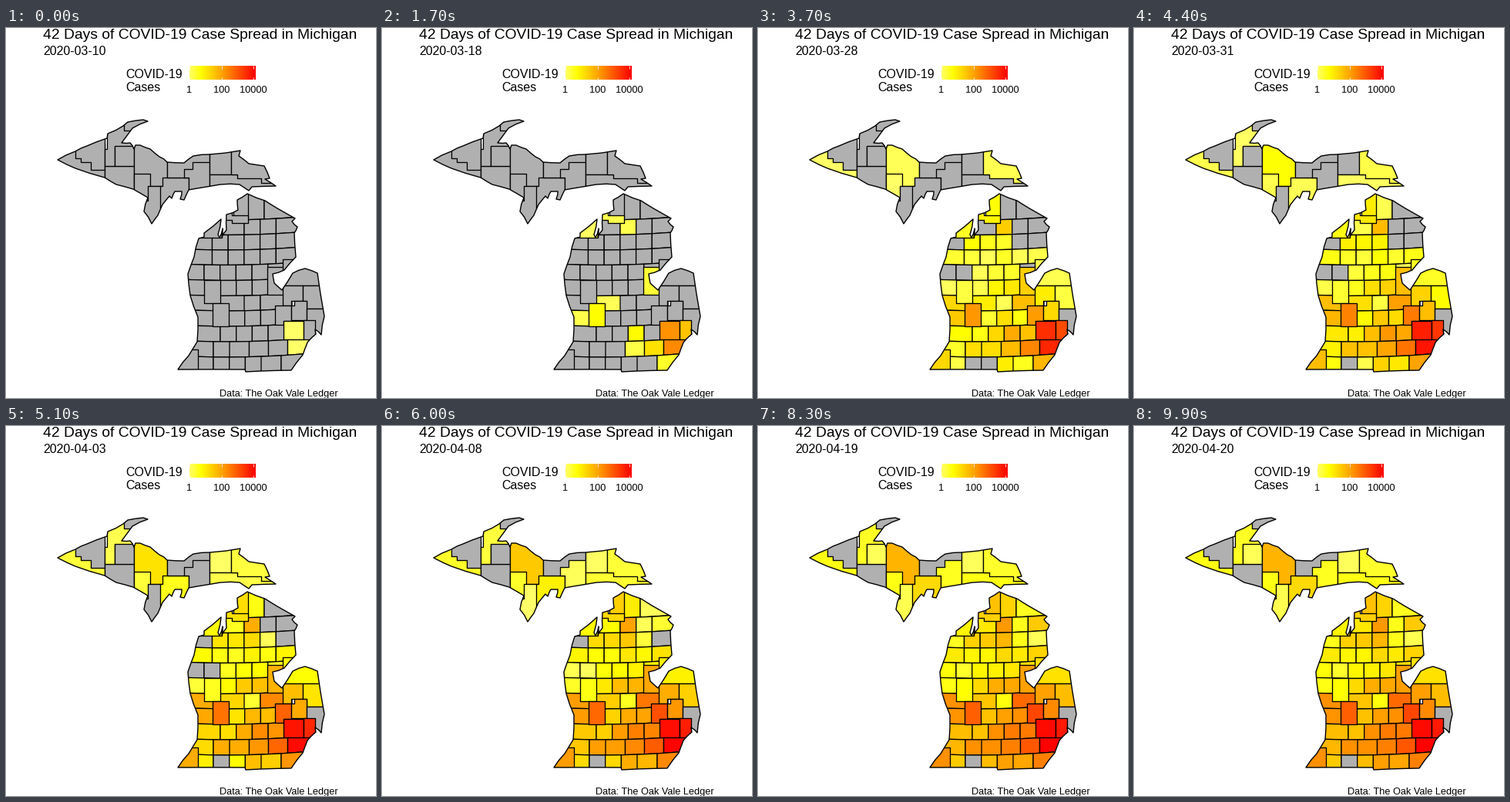
A matplotlib script that plays this animation: 480 px wide and 480 px high, repeating every 10000 ms.

```python
import random

import numpy as np
import matplotlib.pyplot as plt
from matplotlib.animation import FuncAnimation
from matplotlib.colors import LinearSegmentedColormap
from matplotlib.patches import Polygon

SIZE, DPI = 480, 72
FRAMES, INTERVAL = 100, 100
LAST_DAY, DAYS_PER_FRAME = 41, 0.477
NEVER = 99
GREY = "#b0b0b0"
HEAT = LinearSegmentedColormap.from_list(
    "heat", [(0, "#ffff68"), (0.17, "#ffff00"), (0.5, "#ffa000"), (1, "#ff0000")])

random.seed(4)
plt.rcParams["font.family"] = "Liberation Sans"
fig = plt.figure(figsize=(SIZE / DPI, SIZE / DPI), dpi=DPI, facecolor="white")
ax = fig.add_axes([0, 0, 1, 1])
ax.axis("off")

UPPER_NORTH = [
    (67, 171), (90, 160), (105, 153), (131, 143), (132, 137), (152, 127), (158, 122),
    (178, 119), (184, 121), (164, 130), (150, 149), (161, 149), (166, 157), (168, 152),
    (174, 152), (187, 157), (199, 167), (209, 174), (231, 175), (243, 166), (264, 164),
    (304, 159), (302, 166), (315, 176), (335, 179), (342, 195), (336, 196), (350, 205)]
UPPER_SOUTH = [
    (319, 206), (315, 211), (303, 203), (278, 203), (248, 208), (237, 210), (231, 223),
    (226, 222), (228, 212), (219, 212), (215, 221), (212, 218), (203, 229), (197, 243),
    (189, 254), (179, 238), (184, 220), (165, 209), (143, 203), (128, 194), (90, 182)]
LOWER_EAST = [
    (313, 215), (336, 224), (352, 234), (375, 247), (371, 251), (378, 258), (374, 266),
    (376, 297), (361, 314), (346, 319), (348, 331), (358, 340), (372, 318), (388, 312),
    (404, 318), (413, 374), (409, 398), (401, 391), (402, 397), (391, 408), (385, 424),
    (370, 444), (331, 445), (311, 446), (310, 443)]
LOWER_WEST = [
    (223, 443), (237, 425), (248, 407), (249, 375), (239, 347), (236, 319), (244, 297),
    (250, 273), (257, 271), (257, 266), (279, 248), (275, 268), (277, 272), (281, 260),
    (280, 271), (286, 262), (286, 242), (301, 236), (300, 223)]

counties = []


def land(points):
    """Coast with a slightly rough midpoint on every longer stretch."""
    coast = []
    for (x, y), (u, v) in zip(points, points[1:] + points[:1]):
        coast.append((x, y))
        if abs(u - x) + abs(v - y) > 9:
            coast.append(((x + u) / 2 + random.uniform(-0.8, 0.8),
                          (y + v) / 2 + random.uniform(-0.8, 0.8)))
    shape = Polygon(coast, fc="none", ec="black", lw=1.4, joinstyle="round", zorder=3)
    ax.add_patch(shape)
    return shape


def county(coast, onset, level, points):
    patch = Polygon(points, fc=GREY, ec="black", lw=1.3, joinstyle="round")
    ax.add_patch(patch)
    patch.set_clip_path(coast)
    counties.append((patch, onset, level))


def block(coast, onset, level, *path):
    """County with square corners; path alternates x and y moves."""
    xs, ys = path[::2], path[1::2]
    points = [(xs[0], ys[0])]
    for i in range(1, len(xs)):
        points += [(xs[i], ys[i - 1]), (xs[i], ys[i])]
    county(coast, onset, level, points + [(xs[0], ys[-1])])


def bend(x, y):
    """Parallels sag slightly towards the middle of the map."""
    return x, y - 0.0004 * (x - 285) ** 2


def row(top, bottom, left, right, *cells, step=20.7):
    """Counties side by side; later ones may cover the overhang of the last."""
    for i, (onset, level) in enumerate(cells):
        edge = right + (12 if i == len(cells) - 1 else 0)
        corners = [(left, top), (edge, top), (edge, bottom), (left, bottom)]
        county(lower, onset, level, [bend(x, y) for x, y in corners])
        left, right = right, right + step


upper, lower = land(UPPER_NORTH + UPPER_SOUTH), land(LOWER_EAST + LOWER_WEST)

# Upper Peninsula: first day with cases, final level, outline
block(upper, 17, 0.14, 60, 150, 128, 210)
block(upper, NEVER, 0, 90, 140, 128, 184, 110, 174, 97, 169)
block(upper, NEVER, 0, 128, 179, 166, 215)
block(upper, 20, 0.11, 131, 120, 165, 154, 141, 179, 128, 157)
block(upper, NEVER, 0, 153, 115, 190, 133)
block(upper, 37, 0.03, 141, 153, 166, 179)
block(upper, 17, 0.43, 166, 145, 209, 205)
block(upper, 17, 0.14, 166, 189, 187, 224)
block(upper, 28, 0.04, 184, 205, 201, 260, 165, 224)
block(upper, 20, 0.3, 203, 194, 237, 240, 200, 205)
block(upper, NEVER, 0, 209, 160, 264, 194)
block(upper, 27, 0.12, 242, 174, 264, 215, 237, 194, 231, 183)
block(upper, 22, 0.02, 264, 155, 292, 190)
block(upper, 20, 0.14, 264, 190, 352, 215)
block(upper, 12, 0.1, 292, 150, 360, 201, 331, 195, 300, 190)

# Lower Peninsula grid: first day with cases, final level
row(200, 249, 314, 335, (20, 0.32), (27, 0.12), step=40)
row(249, 268.5, 278, 309, (19, 0.25), (7, 0.52), (27, 0.13), (27, 0.35))
row(268.5, 288, 240, 267.5, (37, 0.13), (10, 0.33), (13, 0.35), (15, 0.42),
    (22, 0.13), (38, 0.04))
row(288, 307.5, 235, 267.5, (12, 0.24), (12, 0.2), (16, 0.2), (13, 0.3),
    (16, 0.24), (16, 0.32))
row(307.5, 327.5, 230, 257, (27, 0.16), (27, 0.1), (16, 0.2), (12, 0.22),
    (12, 0.25), (20, 0.28))
row(327.5, 347.5, 230, 278, (16, 0.14), (16, 0.3), (12, 0.45), (10, 0.47))
row(347.5, 367, 230, 278, (10, 0.55), (7, 0.37), step=31)
row(347.5, 367, 309, 330, (15, 0.15), (10, 0.67), step=29)
row(367, 387, 240, 289, (7, 0.54), (15, 0.38), (10, 0.5), (15, 0.55))
row(387, 407, 240, 278, (12, 0.4), (13, 0.38), (10, 0.55), (4, 0.62), (9, 0.62))
row(407, 427, 235, 269, (15, 0.42), (11, 0.55))
row(407, 427, 290, 315.5, (11, 0.55), (7, 0.6), (3, 0.73), (0, 1), step=25)
row(427, 460, 215, 269, (16, 0.35), (NEVER, 0), (20, 0.4), (12, 0.5))
row(427, 460, 331, 357, (15, 0.48), (6, 0.6), step=26)

# Counties that break the grid
block(lower, 12, 0.38, 295, 210, 314, 249)
block(lower, 6, 0.33, 280, 235, 293, 243, 314, 253, 293, 249)
block(lower, 7, 0.2, 250, 240, 280, 272)
block(lower, 12, 0.17, 257, 327, 278, 357)
block(lower, 5, 0.7, 268, 357, 289, 387)
block(lower, 6, 0.5, 339, 310, 370, 346)
block(lower, 16, 0.27, 359, 300, 415, 334)
block(lower, 12, 0.5, 359, 334, 385, 354, 370, 360)
block(lower, 16, 0.4, 385, 334, 415, 364, 390, 354)
block(lower, 9, 0.78, 349, 360, 370, 380, 360, 385)
block(lower, 11, 0.57, 374, 354, 390, 379, 370, 360)
block(lower, NEVER, 0, 390, 364, 415, 402)
block(lower, 0, 0.97, 360, 380, 386, 404)
block(lower, 3, 0.92, 386, 379, 401, 404)
block(lower, 10, 0.55, 215, 417, 249, 450)

# Titles and legend
ax.text(48, 14, "42 Days of COVID-19 Case Spread in Michigan", size=19.2)
date = ax.text(48.3, 35, "", size=16)
ax.text(155.3, 65, "COVID-19", size=16)
ax.text(155.3, 82, "Cases", size=16)
ax.text(431, 478, "Data: The Oak Vale Ledger", size=12.8, ha="right")
ax.imshow(np.linspace(0, 1, 256)[None], cmap=HEAT, extent=(238, 324, 67, 49), aspect="auto")
for x, label in [(238, "1"), (279.5, "100"), (321, "10000")]:
    ax.text(x, 84, label, size=12.8, ha="center")
    ax.vlines([x, x], [49, 63.5], [52.5, 67], color="white", lw=0.8)

ax.set_xlim(0, SIZE)
ax.set_ylim(SIZE, 0)


def date_text(day):
    day += 10
    return f"2020-03-{day:02d}" if day <= 31 else f"2020-04-{day - 31:02d}"


def heat_level(day, onset, level):
    """Fast early growth that flattens towards the final level."""
    u = (day - onset) / (LAST_DAY - onset)
    return level * (1 - (1 - u) ** (1.8 + 2 * level))


def update(frame):
    day = min(frame * DAYS_PER_FRAME, LAST_DAY)
    date.set_text(date_text(int(day + 0.5)))
    for patch, onset, level in counties:
        patch.set_facecolor(HEAT(heat_level(day, onset, level)) if day >= onset else GREY)
    return [date] + [c[0] for c in counties]


anim = FuncAnimation(fig, update, frames=FRAMES, interval=INTERVAL,
                     repeat=True, repeat_delay=0, blit=False)
plt.show()
```
